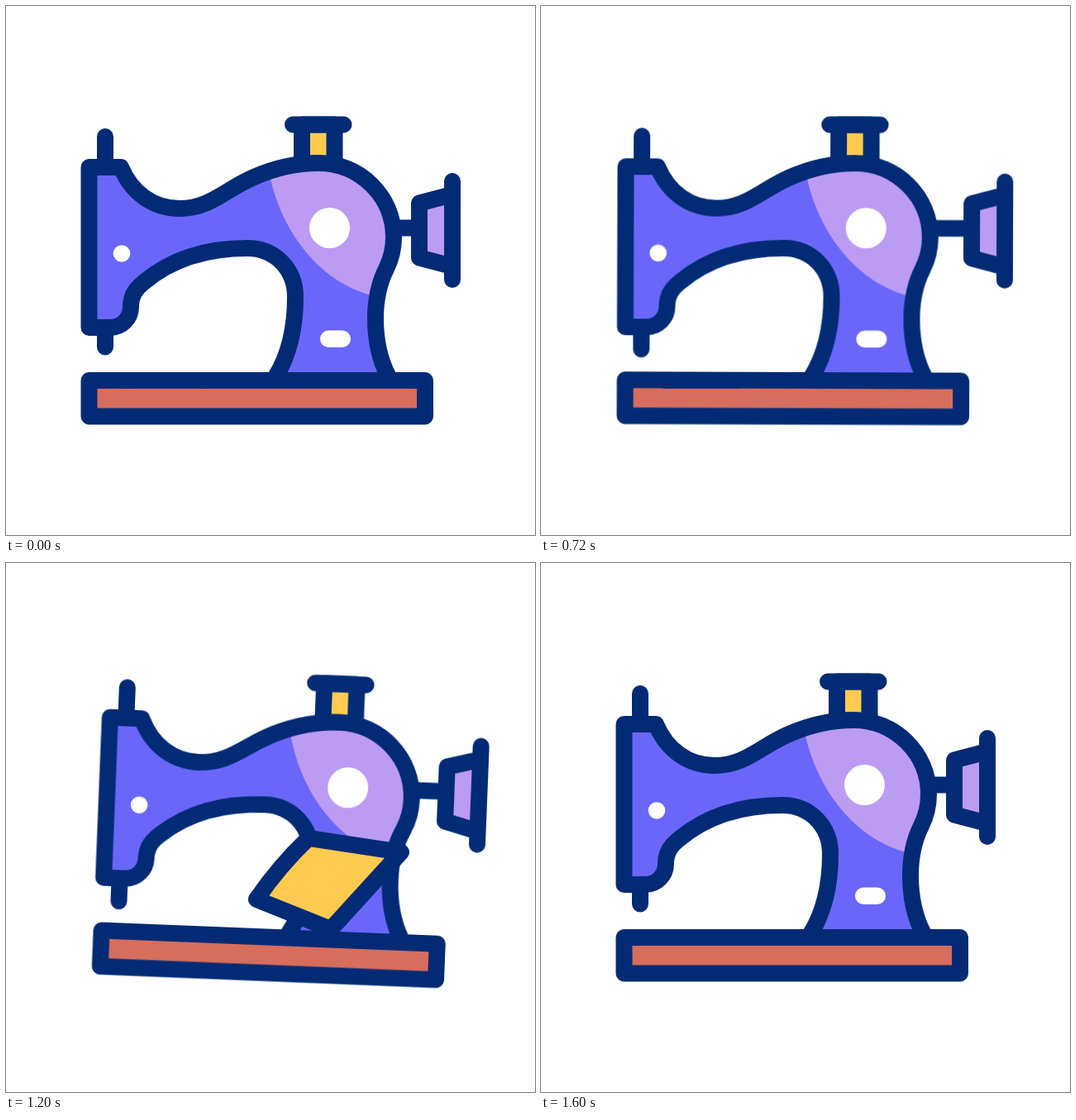
An HTML page for the animation above (1760 ms loop, 640 px wide and 640 px high).

```html
<!DOCTYPE html>
<html lang="en">
<head>
<meta charset="utf-8">
<title>Sewing machine</title>
<style>
  html, body { margin: 0; height: 100%; overflow: hidden; background: #fff; }
  svg { display: block; width: 100vw; height: 100vh; }

  .line { fill: none; stroke: #032b75; stroke-width: 20; stroke-linecap: round; stroke-linejoin: round; }
  .violet { fill: #6a66fa; }
  .lilac { fill: #bc9bf3; }
  .yellow { fill: #fecb50; }
  .red { fill: #d66d5d; }
  .white { fill: #fff; }

  .machine, .wheel, .needle, .cloth { animation: 1760ms ease-in-out infinite; }
  .machine { animation-name: tilt; transform-origin: 320px 827px; }
  .wheel { animation-name: pull; }
  .needle { animation-name: stitch; }
  .cloth { animation-name: fly; }

  @keyframes tilt {
    0%, 38.35% { transform: rotate(0deg); }
    52.84%, 61.93% { transform: rotate(2.83deg); }
    82.67%, 100% { transform: rotate(0deg); }
  }
  @keyframes pull {
    0%, 3.41% { transform: translateX(0); }
    46.59% { transform: translateX(20px); }
    90.9%, 100% { transform: translateX(0); }
  }
  @keyframes stitch {
    0%, 2.84%, 37.5%, 72.16%, 100% { transform: translateY(0); }
    20.17%, 54.83% { transform: translateY(41px); }
  }
  /* The cloth waits inside the base line, rises, then speeds off to the right. */
  @keyframes fly {
    0%, 42.05% {
      d: path("M172 453 L240 453 Q240 453 240 453 L150 453 Q160 453 172 453 Z");
      animation-timing-function: ease-in-out;
    }
    50% {
      d: path("M180 431 L256 437 Q257 441 255 445 L160 440 Q168 432 180 431 Z");
      animation-timing-function: cubic-bezier(.33, .1, .67, .44);
    }
    68.18% {
      d: path("M365 333 L477 350 Q434 397 392 443 L302 407 Q329 367 365 333 Z");
      animation-timing-function: cubic-bezier(.33, .28, .67, .61);
    }
    77.27% {
      d: path("M545 310 L657 317 Q654 382 576 432 L487 391 Q548 357 545 310 Z");
      animation-timing-function: linear;
    }
    85.23%, 100% {
      d: path("M755 300 L867 305 Q870 375 790 425 L700 383 Q762 345 755 300 Z");
    }
  }
</style>
</head>
<body>
<svg viewBox="0 0 640 640">
  <defs>
    <path id="body" d="M326 449 C342 423 350 388 350 352 C350 318 325 293 292 293
      C240 293 198 308 167 334 C157 342 151 350 151 364 C151 378 140 389 126 389
      L100.5 389 L100.5 195 L139 195 C152 226 178 245 210 245
      C247 245 265 222 300 207 C325 196 350 190 378 190
      C428 190 469 230 469 280 C469 295 466 306 460 318
      C451 336 447 357 447 378 C447 405 453 430 463 449"/>
    <clipPath id="inside"><use href="#body"/></clipPath>
  </defs>

  <g class="machine">
    <g class="wheel">
      <path class="line" d="M450 268.5 H500"/>
      <path class="line lilac" style="fill:#bc9bf3" d="M540 228 L500 238.5 V304.5 L540 315"/>
      <path class="line" d="M540 212 V331"/>
    </g>

    <path class="line" style="fill:#fecb50" d="M358 190 V143.5 H397.5 V190"/>
    <path class="line" d="M347 143.5 H408.5 M120 158 V190"/>
    <path class="line needle" d="M120 335 V412.5"/>

    <use href="#body" class="violet"/>
    <path class="lilac" clip-path="url(#inside)" d="M318 200 C331 268 375 333 445 351 H500 V170 H318 Z"/>
    <use href="#body" class="line"/>

    <circle class="white" cx="391.5" cy="268.5" r="24.5"/>
    <circle class="white" cx="140" cy="299.5" r="10.3"/>
    <rect class="white" x="380" y="392.5" width="37" height="20.5" rx="10.25"/>

    <rect class="line" style="fill:#d66d5d" x="100.5" y="453" width="406.5" height="43.5"/>
  </g>

  <path class="line cloth" style="fill:#fecb50" d="M172 453 L240 453 Q240 453 240 453 L150 453 Q160 453 172 453 Z"/>
</svg>
</body>
</html>
```
